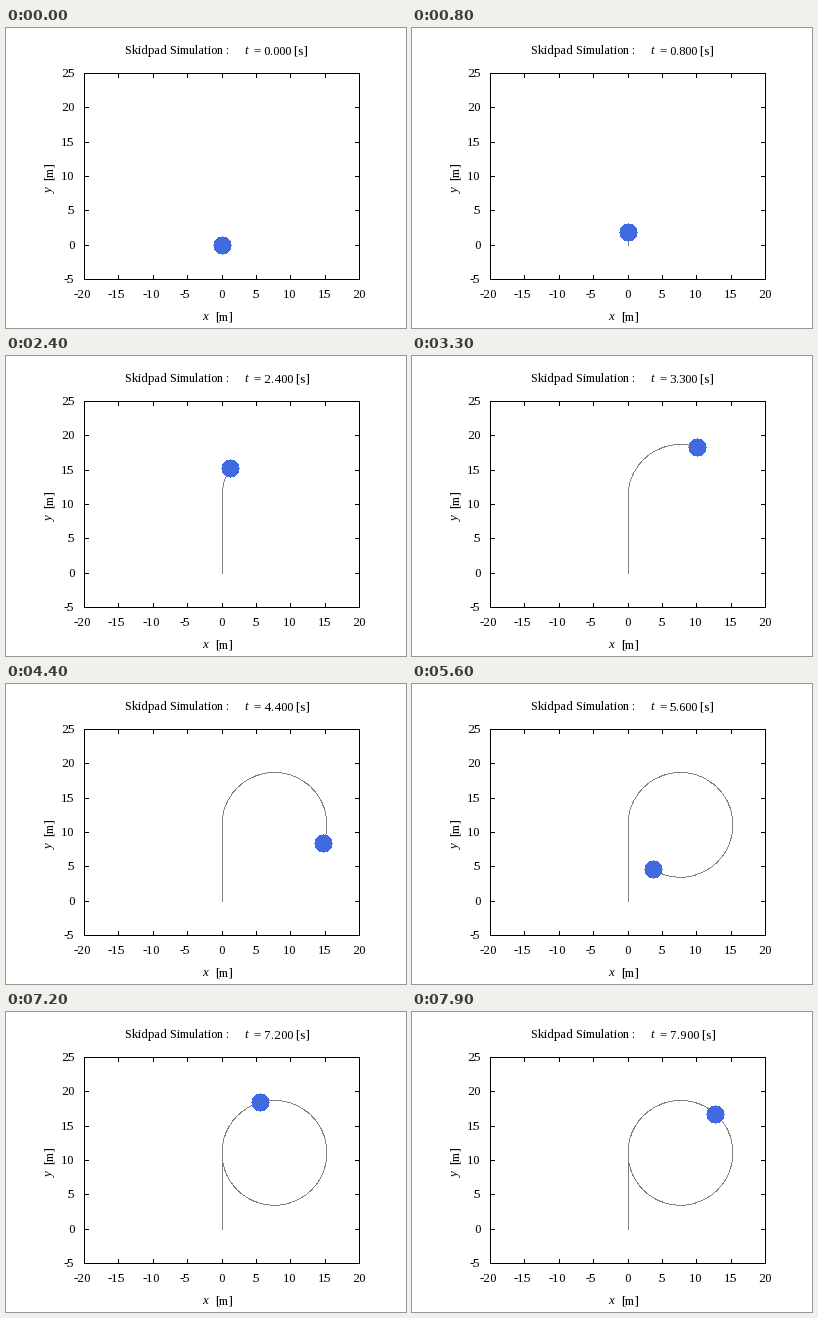
These frames come from a looping animation (400x300 px, 8000 ms). A matplotlib script:

```python
import numpy as np
import matplotlib.pyplot as plt
from matplotlib.animation import FuncAnimation

plt.rcParams.update({
    "font.family": "Liberation Serif",
    "font.size": 9.6,
    "text.hinting": "force_autohint",
    "text.hinting_factor": 1,
})

W, H, DPI = 400, 300, 100
PX = 72 / DPI                      # one pixel in points
LEFT, RIGHT, TOP, BOTTOM = 78, 353, 45, 251
TICK = 4

FRAMES, STEP = 80, 0.1             # seconds of simulation per frame
SPEED = 40 / 3.6                   # m/s
RAMP = 2.0                         # seconds of acceleration
RADIUS = 7.625                     # m

BLUE = (65, 105, 225, 255)
GREY = (128, 128, 128, 255)
BALL = 9                           # ball radius in pixels


def to_px(x, y):
    """Plot coordinates to whole pixels."""
    px = LEFT + (np.asarray(x) + 20) * (RIGHT - LEFT) / 40
    py = BOTTOM - (np.asarray(y) + 5) * (BOTTOM - TOP) / 30
    return np.floor(px + 0.5).astype(int), np.floor(py + 0.5).astype(int)


def position(t):
    """Straight run-up at constant acceleration, then a clockwise circle."""
    phi = np.maximum(t - RAMP, 0) * SPEED / RADIUS
    run = SPEED * np.minimum(t, RAMP) ** 2 / (2 * RAMP)
    return RADIUS * (1 - np.cos(phi)), run + RADIUS * np.sin(phi)


fig = plt.figure(figsize=(W / DPI, H / DPI), dpi=DPI, facecolor="white")
ax = fig.add_axes([0, 0, 1, 1])
rows, cols = np.mgrid[:H, :W]
layer = ax.imshow(np.zeros((H, W, 4), np.uint8), extent=(0, W, H, 0),
                  aspect="auto", interpolation="nearest")
ax.set_xlim(0, W)
ax.set_ylim(H, 0)
ax.axis("off")


def line(xs, ys):
    ax.plot(np.asarray(xs) + 0.5, np.asarray(ys) + 0.5, color="black", lw=PX,
            snap=False, solid_capstyle="projecting", solid_joinstyle="miter")


def label(x, y, s, ha="left", **kw):
    return ax.text(x, y, s, ha=ha, va="baseline", rotation_mode="anchor", **kw)


# Frame, ticks and tick labels
line([LEFT, RIGHT, RIGHT, LEFT, LEFT], [TOP, TOP, BOTTOM, BOTTOM, TOP])
for v in range(-20, 21, 5):
    x = to_px(v, 0)[0]
    line([x, x], [BOTTOM, BOTTOM - TICK])
    line([x, x], [TOP, TOP + TICK])
    label(x - (2 if v < 0 else 0.5), 270, str(v), "center")
for v in range(-5, 26, 5):
    y = to_px(0, v)[1]
    line([LEFT, LEFT + TICK], [y, y])
    line([RIGHT, RIGHT - TICK], [y, y])
    label(68, y + 4, str(v), "right")

# Axis names and title
label(196, 292, "x", style="italic")
label(209, 292, "[m]")
label(47, 166, "y", rotation=90, style="italic")
label(47, 152, "[m]", rotation=90)
label(119, 26, "Skidpad Simulation :")
label(238, 26, "t", style="italic")
clock = label(248, 26, "")


def update(i):
    t = i * STEP
    px, py = to_px(*position(np.linspace(0, t, 10 * i + 1)))
    img = np.zeros((H, W, 4), np.uint8)
    img[py, px] = GREY
    img[(cols - px[-1]) ** 2 + (rows - py[-1]) ** 2 <= BALL ** 2] = BLUE
    # The run-up moves faster than it is sampled, never over a pixel apart
    layer.set_data(img)
    clock.set_text(f"= {t:.3f} [s]")
    return layer, clock


anim = FuncAnimation(fig, update, frames=FRAMES, interval=100,
                     repeat=True, repeat_delay=0, blit=False)
plt.show()
```
